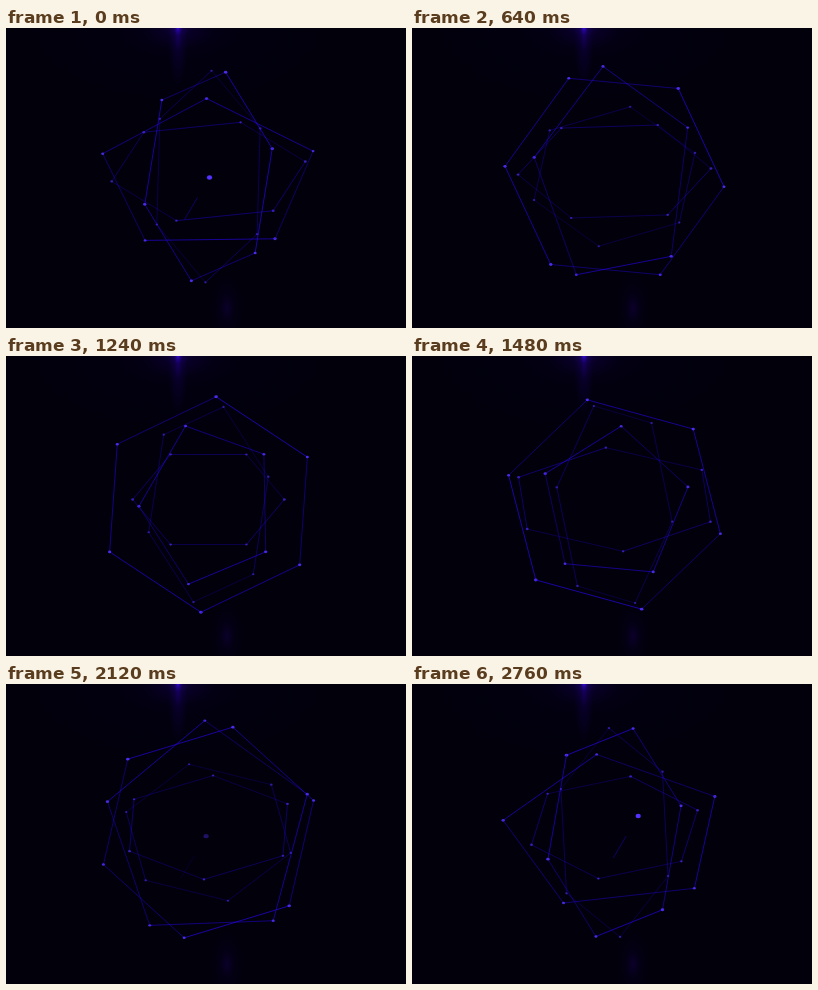
Animation, 400 px wide and 300 px high, one loop 2.84 s. Source, as an HTML page with a canvas:

```html
<!DOCTYPE html>
<html>
<head>
<meta charset="utf-8">
<style>
html, body { margin: 0; width: 100%; height: 100%; overflow: hidden; background: #01000b; }
canvas { display: block; }
</style>
</head>
<body>
<canvas id="stage" width="400" height="300"></canvas>
<script>
const ctx = document.getElementById('stage').getContext('2d');
const LOOP = 2840, STEP = 40, TAU = Math.PI * 2;

const clamp = v => Math.max(0, Math.min(1, v));
const wave = (u, cycles = 1, peak = 0) => Math.cos(cycles * TAU * (u - peak));

// Tumbling polygons: u runs from 0 to 1 over the loop, phase is in degrees.
const rings = [
  {
    sides: 6, alpha: 0.68, y: 148,
    phase: u => -4 + 240 * u + 16 * wave(u, 3, 0.21),
    rx: u => 110 * (1 - 0.4 * Math.max(0, wave(u)) ** 4),
    ry: () => 108
  },
  {
    sides: 5, alpha: 0.62, y: 148,
    phase: u => 53 + 288 * u,
    rx: u => 92 + 23 * wave(u, 1, 0.9),
    ry: u => 95 - 17 * wave(u, 2)
  },
  {
    sides: 6, alpha: 0.42, y: 143,
    phase: u => 49 + 300 * u,
    rx: u => 93 - 30 * wave(u, 2, 0.36),
    ry: () => 52
  },
  {
    sides: 6, alpha: 0.34, y: 148,
    phase: u => 33 + 300 * u,
    rx: u => 72 - 14 * wave(u, 2),
    ry: u => 88 + 18 * wave(u, 2)
  }
];

function corners(ring, u) {
  return Array.from({ length: ring.sides }, (_, i) => {
    const a = (ring.phase(u) / 360 + i / ring.sides) * TAU;
    return [202 + ring.rx(u) * Math.cos(a), ring.y + ring.ry(u) * Math.sin(a)];
  });
}

function line([x0, y0], [x1, y1], alpha) {
  ctx.strokeStyle = `rgba(40,6,235,${alpha})`;
  ctx.beginPath();
  ctx.moveTo(x0 + 0.5, y0 + 0.5);
  ctx.lineTo(x1 + 0.5, y1 + 0.5);
  ctx.stroke();
}

function dot([x, y], r, alpha) {
  ctx.fillStyle = `rgba(84,50,255,${alpha})`;
  ctx.beginPath();
  ctx.ellipse(x + 0.5, y + 0.5, r * 1.2, r, 0, 0, TAU);
  ctx.fill();
}

function glow(x, y, rx, ry, color, alpha) {
  ctx.save();
  ctx.translate(x, y);
  ctx.scale(rx, ry);
  const g = ctx.createRadialGradient(0, 0, 0, 0, 0, 1);
  g.addColorStop(0, `rgba(${color},${alpha})`);
  g.addColorStop(0.4, `rgba(${color},${alpha * 0.3})`);
  g.addColorStop(1, `rgba(${color},0)`);
  ctx.fillStyle = g;
  ctx.fillRect(-1, -1, 2, 2);
  ctx.restore();
}

function background() {
  ctx.fillStyle = '#01000b';
  ctx.fillRect(0, 0, 400, 300);
  glow(172, 0, 150, 75, '30,0,120', 0.14);
  glow(172, 0, 36, 22, '40,0,150', 0.35);
  glow(172, 0, 10, 60, '40,0,170', 0.5);
  glow(172, 0, 4, 7, '60,10,255', 0.85);
  glow(221, 280, 16, 34, '30,0,100', 0.35);
}

function drawRing(ring, u) {
  const pts = corners(ring, u);
  pts.forEach((p, i) => {
    const shine = 0.8 + 0.2 * wave(u, 2, i * 0.31);
    line(p, pts[(i + 1) % ring.sides], ring.alpha * shine);
    dot(p, 0.8 + ring.alpha * shine, 0.2 + ring.alpha);
  });
}

// A reflection near the centre that flashes three times per loop.
function drawSpark(u) {
  const light = clamp(wave(u, 3) + 0.3);
  const drift = Math.sin(6 * TAU * u);
  const x = 203 - 26 * drift, y = 149 + 20 * drift;
  line([x - 12, y + 20], [x - 25, y + 42], light * 0.4);
  dot([x, y], 2.2, light);
}

function frame(now) {
  const t = Math.min(Math.floor((now % LOOP) / STEP) * STEP, LOOP - 2 * STEP);
  background();
  rings.forEach(ring => drawRing(ring, t / LOOP));
  drawSpark(t / LOOP);
  requestAnimationFrame(frame);
}

frame(0);
</script>
</body>
</html>
```
